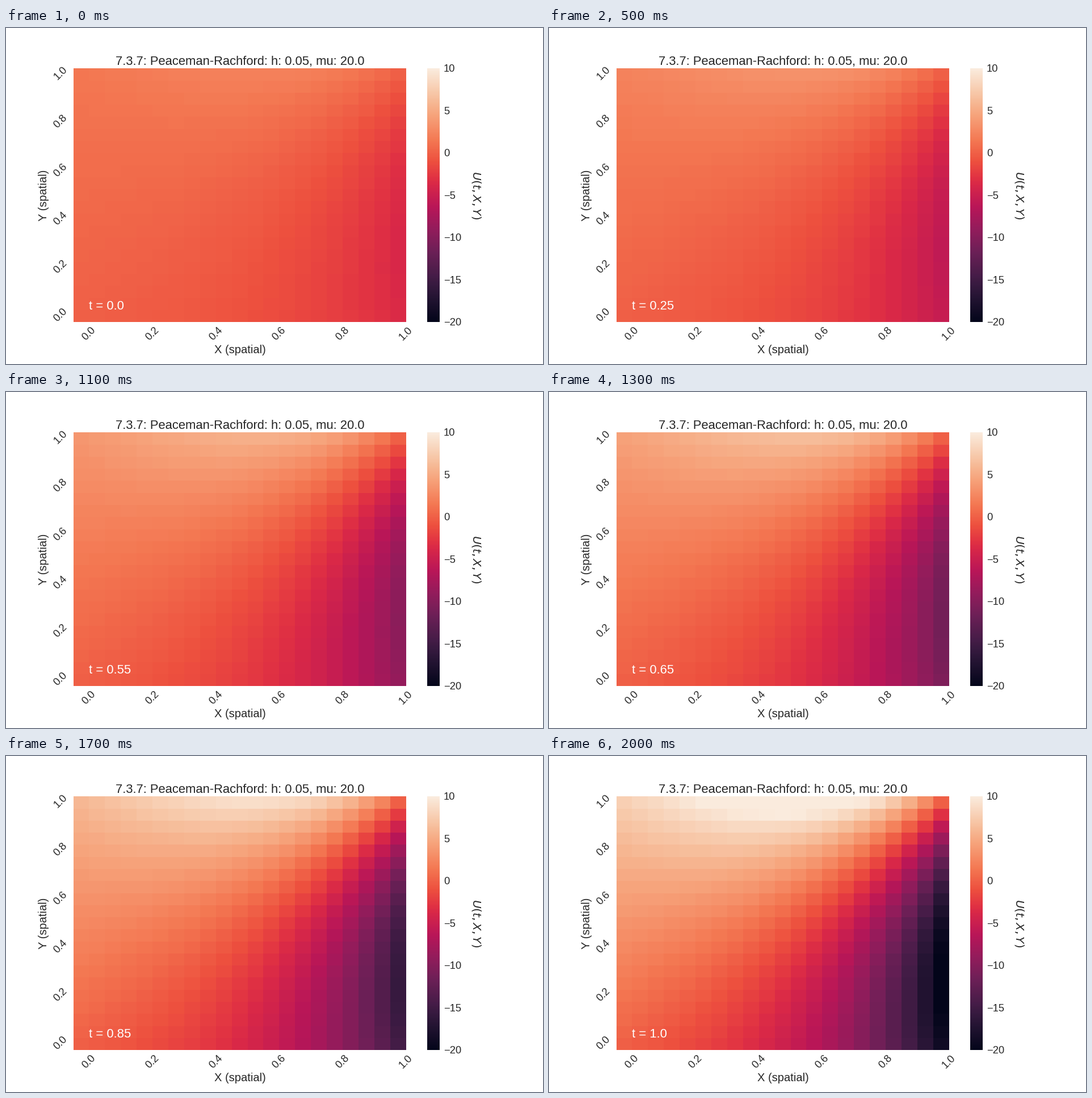
Write a matplotlib script that moves like this. It is 946 by 592 pixels and loops after 2.1 s.

```python
import math

import numpy as np
import matplotlib.pyplot as plt
from matplotlib.animation import FuncAnimation
from matplotlib.colors import LinearSegmentedColormap

W, H, DPI = 946, 592, 64
LEFT, RIGHT, TOP, BOTTOM = 118.3, 704.82, 71.24, 518.2
BAR_LEFT, BAR_RIGHT = 742, 764
N = 21
STEPS = 21
DT = 0.05
VMIN, VMAX = -20, 10
TITLE, LABEL, TICK = 22, 20.17, 18.33  # font sizes in pixels
INK = "#262626"

plt.rcParams["font.family"] = "Liberation Sans"
plt.rcParams["mathtext.fontset"] = "dejavusans"

ROCKET = [
    (0, "#03051a"), (23, "#221331"), (36, "#35193e"), (46, "#451c47"),
    (69, "#691f55"), (73, "#701f57"), (93, "#921c5b"), (109, "#ad1759"),
    (116, "#b91657"), (139, "#d92847"), (146, "#e13342"), (162, "#ed503e"),
    (182, "#f37651"), (186, "#f47d57"), (209, "#f6a47c"), (219, "#f6b48f"),
    (232, "#f7c9aa"), (255, "#faebdd"),
]
cmap = LinearSegmentedColormap.from_list("rocket", [(i / 255, c) for i, c in ROCKET])

fig = plt.figure(figsize=(W / DPI, H / DPI), dpi=DPI, facecolor="white")


def pixel_axes(x0, y0, x1, y1):
    """Axes placed by pixel corners, y counted from the top."""
    return fig.add_axes([x0 / W, 1 - y1 / H, (x1 - x0) / W, (y1 - y0) / H])


def label(x, y, s, size, ha="center", va="baseline", color=INK, **kw):
    return fig.text(x / W, 1 - y / H, s, fontsize=size * 72 / DPI,
                    ha=ha, va=va, color=color, **kw)


grid = np.linspace(0, 1, N)
Y, X = np.meshgrid(grid, grid)
SHAPE = np.sin(1.2 * (X - Y)) * np.cosh(X + 2 * Y)


def solution(t):
    """Solution of u_t = 2 u_xx + u_yy on the unit square."""
    return np.exp(1.68 * t) * SHAPE


cell_w, cell_h = (RIGHT - LEFT) / N, (BOTTOM - TOP) / N
mid_x, mid_y = (LEFT + RIGHT) / 2, (TOP + BOTTOM) / 2

# The first column is cut at the next whole pixel.
clip_left = math.ceil(LEFT)
ax = pixel_axes(clip_left, TOP, RIGHT, BOTTOM)
mesh = ax.pcolormesh(solution(0), cmap=cmap, vmin=VMIN, vmax=VMAX)
ax.set_xlim((clip_left - LEFT) / cell_w, N)
ax.set_ylim(0, N)
ax.axis("off")

cax = pixel_axes(BAR_LEFT, TOP, BAR_RIGHT, BOTTOM)
bar = fig.colorbar(mesh, cax=cax, ticks=[])
bar.outline.set_visible(False)

label(mid_x + 0.5, 65, "7.3.7: Peaceman-Rachford: h: 0.05, mu: 20.0", TITLE)
label(mid_x + 0.5, 573, "X (spatial)", LABEL)
label(72, mid_y, "Y (spatial)", LABEL, rotation=90, rotation_mode="anchor")
label(829, mid_y, "$U(t,X,Y)$", LABEL, va="center", rotation=270)

for i in range(0, N, 4):
    s = f"{i * DT:.1f}"
    label(LEFT + (i + 1) * cell_w, 539.3, s, TICK, va="center", rotation=45)
    label(96.3, BOTTOM - (i + 0.5) * cell_h - 1.8, s, TICK, va="center", rotation=45)

for v in range(VMIN, VMAX + 1, 5):
    y = TOP + (VMAX - v) / (VMAX - VMIN) * (BOTTOM - TOP)
    label(771, y + 6.1, str(v).replace("-", "\u2212"), TICK, ha="left")

clock = label(LEFT + cell_w, 496, "", TITLE, ha="left", color="white")


def update(i):
    t = round(i * DT, 2)
    mesh.set_array(solution(t))
    clock.set_text(f"t = {t}")
    return mesh, clock


anim = FuncAnimation(fig, update, frames=STEPS, interval=100, repeat=True)
plt.show()
```
